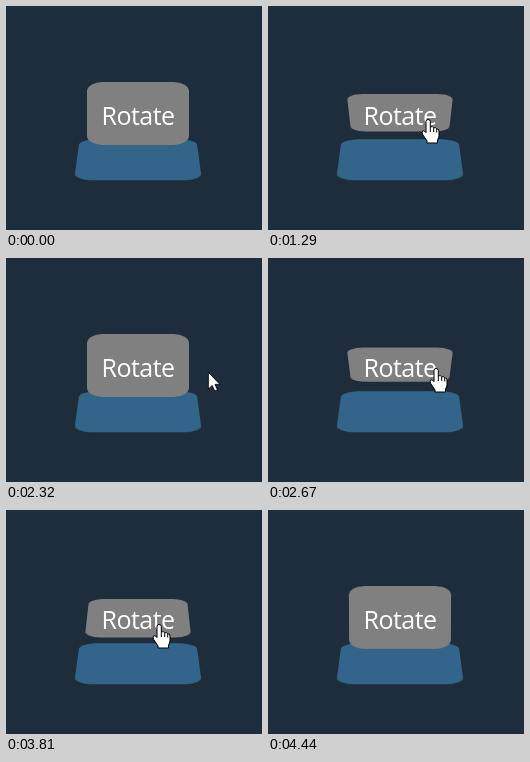
An HTML page that plays this animation: 256x224 px, repeating every 5380 ms.

```html
<!DOCTYPE html>
<html lang="en">
<head>
<meta charset="utf-8">
<title>Rotate button</title>
<style>
  html, body { margin: 0; width: 100%; height: 100%; overflow: hidden; background: #1e2d3b; }
  #stage { position: relative; width: 256px; height: 224px; overflow: hidden; }
  #stage > * { position: absolute; }
  #base {
    left: 71px; top: 118.7px; width: 122px; height: 67.6px;
    border-radius: 15%; background: #33658a;
    transform: perspective(600px) rotateX(53deg);
  }
  #button {
    left: 81px; top: 76px; width: 102px; height: 63px;
    border-radius: 15%; background: #808080;
  }
  #label {
    left: 81px; top: 76px; width: 102px;
    font: 500 25px/66px "Open Sans", "Noto Sans", sans-serif;
    letter-spacing: -.5px; color: #fff; text-align: center;
  }
  #cursor { left: 0; top: 0; overflow: visible; fill: #fff; stroke: #000; stroke-linejoin: round; }
</style>
</head>
<body>
<div id="stage">
  <div id="base"></div>
  <div id="button"></div>
  <div id="label">Rotate</div>
  <svg id="cursor" width="1" height="1">
    <path id="arrow" stroke-width=".8" d="M.4 .4V17L4.2 13.4L6.8 19L9.4 17.8L7 12.4H12Z"/>
    <g id="hand">
      <path d="M-3 1.5Q-3 -.5 -1 -.5Q1.3 -.5 1.3 1.5V7Q3.6 5.9 4.7 7.8Q6.8 6.8 7.7 8.9Q10 8.4 10 11V16Q9.8 18 8.5 20V23H-2V21L-6.3 14.5Q-7.6 11.8 -6.2 10.8Q-4.6 10.2 -3 12.6Z"/>
      <path d="M1.3 7V12M4.7 8V12M7.7 9V12.5" fill="none"/>
    </g>
  </svg>
</div>
<script>
const LOOP = 5380, STEP = 70, ARRIVAL = 270;
const $ = id => document.getElementById(id);

// The pointer eases in, rests on the button, then leaves; each entry starts a half turn.
const visits = [
  { start: 730, turn: 875, leave: 1640, end: 1920, from: [228, 124], rest: [161, 114], to: [230, 116] },
  { start: 2190, turn: 2270, leave: 2670, end: 3400, from: [230, 116], rest: [169, 111], to: [235, 115] },
  { start: 3530, turn: 3612, leave: 4020, end: 4440, from: [235, 115], rest: [154, 115], to: [185, 189] }
];

const flip = $('button').animate(
  { transform: ['perspective(600px) rotateX(0deg)', 'perspective(600px) rotateX(180deg)'] },
  { duration: 1000, easing: 'ease', fill: 'both' }
);
flip.pause();

const mix = (a, b, k) => a.map((v, i) => Math.round(v + (b[i] - v) * k));
const progress = (t, start, end) => Math.min(1, (t - start) / (end - start));
const show = (id, on) => { $(id).style.display = on ? '' : 'none'; };

function pointerAt(t, { start, leave, end, from, rest, to }) {
  if (t >= leave) return mix(rest, to, progress(t, leave, end));
  return mix(from, rest, 1 - (1 - progress(t, start, start + ARRIVAL)) ** 2);
}

function draw(now) {
  const visit = visits.findLast(v => v.start <= now);
  show('cursor', visit && now < visits.at(-1).end);
  if (!visit) {
    flip.currentTime = 0;
    return;
  }
  // The picture advances in steps, counted from the latest move.
  const base = now >= visit.leave ? visit.leave : visit.start;
  const t = base + Math.floor((now - base) / STEP) * STEP;
  flip.currentTime = Math.min(1000, Math.max(0, t - visit.turn));

  const [x, y] = pointerAt(t, visit);
  const over = x < 183 && y < 139;
  $('cursor').style.transform = `translate(${x}px, ${y}px)`;
  show('hand', over);
  show('arrow', !over);
}

const began = performance.now();
function tick() {
  draw((performance.now() - began) % LOOP);
  requestAnimationFrame(tick);
}
tick();
</script>
</body>
</html>
```
